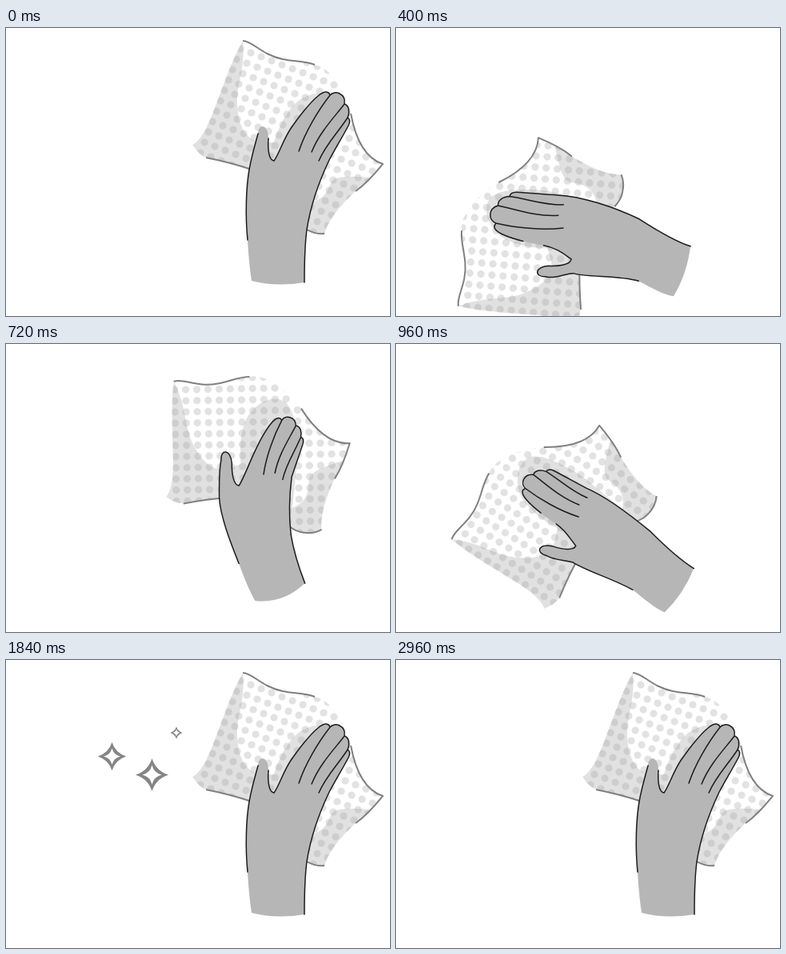
An HTML page with a canvas that plays this animation: 480 px wide and 360 px high, repeating every 3.04 s.

```html
<!DOCTYPE html>
<html lang="en">
<head>
<meta charset="utf-8">
<title>Wiping hand</title>
<style>
  html, body { margin: 0; width: 100%; height: 100%; overflow: hidden; background: #fff; }
  canvas { display: block; width: 480px; height: 360px; }
</style>
</head>
<body>
<canvas id="stage" width="480" height="360"></canvas>
<script>
const ctx = document.getElementById('stage').getContext('2d');
const LOOP = 3040, STEP = 80, SWING = 480, FIRST = 160, LAST = 1120, REST = 1280;
const rad = a => a * Math.PI / 180;
const mix = (a, b, k) => a + (b - a) * k;

// Each row: at rest, far right, passing leftwards, far left, passing rightwards
const channels = {
  baseX:    [340, 339, 342.5, 357.5, 354],
  baseY:    [317, 315, 310, 304, 308],
  baseRot:  [0, -4, -21, -73, -58],
  reachA:   [-79, -74, -95.8, -165, -144.9],
  reachR:   [228.2, 226, 225.7, 237.6, 234.7],
  clothRot: [0, 6, -22, -106, -79],
  fingerX:  [-3.8, -15.5, -15.7, -14.6, -16.1],
  fingerY:  [65.3, 77, 78.9, 78, 74.4],
  fingerRot:[0, 8, 11.5, -9, -12],
  fingerLen:[1, .94, .89, 1.05, .94],
  thumbX:   [-47.5, -60, -59.4, -68.5, -64.8],
  thumbY:   [72, 74, 73.6, 74, 75.8],
  thumbRot: [0, 12, 18, 13, 2],
  bulge:    [0, 20, 28, 0, 0]
};

// Smooth periodic curve through the values at 0, 60, 180 and 240 degrees
function wave([, right, toLeft, left, toRight], p) {
  const c = (right - left) / 2;
  const d = (right + left - toLeft - toRight) / 3;
  const a = (right + left) / 2 - d;
  const s = ((toLeft - toRight) / 2 - c / 2) / Math.sin(Math.PI / 3);
  return a + c * Math.cos(p) + s * Math.sin(p) + d * Math.cos(2 * p);
}

function poseAt(t) {
  const swing = Math.min(Math.max(t, FIRST), LAST);
  const p = (swing - FIRST) / SWING * 2 * Math.PI;
  let k = 1;
  if (t < FIRST) k = t / FIRST;
  if (t > LAST) k = Math.max(0, (REST - t) / (REST - LAST));
  const pose = {};
  for (const name in channels) {
    const v = channels[name];
    pose[name] = mix(v[0], wave(v, p), k);
  }
  pose.moving = k > 0;
  return pose;
}

// Turn and scale around (px, py), then carry that pivot to (x, y)
function bone(px, py, x, y, deg, size = 1) {
  const c = size * Math.cos(rad(deg)), s = size * Math.sin(rad(deg));
  return (u, v) => [
    x + (u - px) * c - (v - py) * s,
    y + (u - px) * s + (v - py) * c
  ];
}

const blend = (a, b, w) => [mix(a[0], b[0], w), mix(a[1], b[1], w)];

function rig(q) {
  const cx = q.baseX + q.reachR * Math.cos(rad(q.reachA));
  const cy = q.baseY + q.reachR * Math.sin(rad(q.reachA));
  const cloth = bone(0, 0, cx, cy, q.clothRot);
  const base = bone(340, 317, q.baseX, q.baseY, q.baseRot);
  const finger = bone(379.7, 158.3, ...cloth(q.fingerX, q.fingerY),
    q.clothRot + q.fingerRot, q.fingerLen);
  const thumb = bone(336, 165, ...cloth(q.thumbX, q.thumbY), q.clothRot + q.thumbRot);
  const joint = tip => (x, y, w) => {
    const r = blend(base(x, y), tip(x, y), w);
    return [r[0] + q.bulge * w * (1 - w), r[1]];
  };
  return { cx, cy, base, finger, thumb, arm: joint(finger), heel: joint(thumb) };
}

// Adds cubic pieces (three points each) to the current path
function curves(pts) {
  for (let i = 0; i + 2 < pts.length; i += 3)
    ctx.bezierCurveTo(...pts[i], ...pts[i + 1], ...pts[i + 2]);
}

function line(start, pts) {
  ctx.moveTo(...start);
  curves(pts);
}

const clothShape = new Path2D(`M296 16 C308 16 320 34 346 39 C360 42 374 41 386 46
  C405 50 420 72 431 107 C437 140 450 163 471 170 C463 180 450 195 437 204
  C418 222 404 238 398 257 Q386 258 376 252 Q368 248 362 238 L304 176 Q280 168 250 162
  Q240 158 233 146 C256 135 268 65 296 16Z`);
const clothLight = new Path2D(`M295 10 C302 50 284 75 290 106 C293 130 305 141 318 143
  L335 143 C342 120 355 95 372 87 C390 78 410 80 417 95 C421 112 416 130 405 160
  L374 218 C392 218 400 210 407 192 C412 185 430 185 455 187 L490 170 L480 0Z`);
const clothEdge = new Path2D(`M296 16 C308 16 320 34 346 39 C360 42 374 41 386 46
  M431 107 C437 140 450 163 471 170 C463 180 450 195 437 204
  M398 257 Q386 258 376 252 Q368 248 362 238 M304 176 Q280 168 250 162`);
const dots = new Path2D();
for (let i = -14; i < 14; i++) {
  for (let j = -14; j < 14; j++) {
    const x = 354 + i * 13 + j * 5, y = 139 + i * 5 - j * 13;
    dots.moveTo(x + 4.6, y);
    dots.arc(x, y, 4.6, 0, 7);
  }
}

function drawCloth(r, q) {
  ctx.save();
  ctx.translate(r.cx, r.cy);
  ctx.rotate(rad(q.clothRot));
  ctx.translate(-383.5, -93);
  ctx.save();
  ctx.clip(clothShape);
  ctx.fillStyle = '#e1e1e1';
  ctx.fill(clothShape);
  ctx.fillStyle = '#fff';
  ctx.fill(clothLight);
  ctx.fillStyle = 'rgba(160,160,160,.3)';
  ctx.fill(dots);
  ctx.restore();
  ctx.strokeStyle = '#808080';
  ctx.lineWidth = 2;
  ctx.stroke(clothEdge);
  ctx.restore();
}

function drawHand(r, q) {
  const { base: B, finger: F, thumb: T, arm: A, heel: H } = r;
  const cuffL = B(307, 316), cuffR = B(373, 318);
  const sleeve = A(302, 265, .14), heel = H(304, 177, .42);
  const side = T(315, 132), inner = T(328, 138), web = T(335, 166);
  const k1 = F(357, 124), k2 = F(372, 104);
  const index = F(405, 84), middle = F(423, 95), ring = F(427, 112), little = F(428, 122);

  const cuffEdge = [B(305, 302), A(303, 285, .07), sleeve];
  const outer = [A(299, 235, .24), H(300, 200, .27), heel];
  const thumbOut = [H(307, 160, .65), T(311, 147), side];
  const thumbTip = [T(315, 119), T(328, 119), inner];
  const thumbIn = [T(327, 150), T(328, 165), web];
  const palm = [T(341, 158), F(347, 138), k1];
  const gap = [F(362, 117), F(367, 110), k2];
  const tips = [
    F(381, 93), F(400, 71), index,
    F(411, 77), F(425, 82), middle,
    F(429, 97), F(430, 105), ring,
    F(430, 114), F(430, 118), little
  ];
  const back = [F(420, 137), F(412, 150), F(404, 165), A(394, 186, .8), A(381, 220, .43), A(376, 252, .22),
    A(373, 275, .1), B(373, 300), cuffR];

  ctx.beginPath();
  line(cuffL, [...cuffEdge, ...outer, ...thumbOut, ...thumbTip, ...thumbIn, ...palm, ...gap, ...tips, ...back]);
  ctx.quadraticCurveTo(...B(338, 324 + q.bulge * .3), ...cuffL);
  ctx.fillStyle = '#b6b6b6';
  ctx.fill();

  ctx.beginPath();
  line(sleeve, [...outer, ...thumbOut]);
  if (q.moving) line(side, thumbTip);
  line(inner, [...thumbIn, ...palm]);
  if (q.clothRot > -50) line(k1, gap);
  line(k2, [...tips, ...back]);
  line(F(366, 154), [F(374, 130), F(390, 103), index]);
  line(F(382, 155), [F(392, 130), F(410, 112), middle]);
  line(F(391, 166), [F(400, 145), F(414, 132), ring]);
  ctx.strokeStyle = '#1c1c1c';
  ctx.lineWidth = 1.5;
  ctx.lineCap = ctx.lineJoin = 'round';
  ctx.stroke();
  ctx.lineCap = 'butt';
}

const sparkles = [
  { x: 132.5, y: 120.5, r: 16.5, keys: [[1520, 0], [1760, 1.3], [1920, .85], [2080, 1.18], [2400, 1]] },
  { x: 182.5, y: 143.5, r: 20, keys: [[1600, 0], [1840, 1.03], [2000, .8], [2160, 1.03], [2400, 1]] },
  { x: 213, y: 91, r: 11.5, keys: [[1680, 0], [1920, 1], [2080, .75], [2240, 1], [2320, .9], [2400, 1]] }
];
const FADE = [[2480, 1], [2800, 0]];

function keyed(keys, t) {
  if (t <= keys[0][0]) return keys[0][1];
  for (let i = 1; i < keys.length; i++) {
    const [ta, a] = keys[i - 1], [tb, b] = keys[i];
    if (t < tb) return mix(a, b, (t - ta) / (tb - ta));
  }
  return keys[keys.length - 1][1];
}

function star(x, y, r, bend, color) {
  ctx.beginPath();
  ctx.moveTo(x + r, y);
  for (let i = 0; i < 4; i++) {
    const m = rad(i * 90 + 45), n = rad(i * 90 + 90);
    ctx.quadraticCurveTo(x + r * bend * Math.cos(m), y + r * bend * Math.sin(m),
      x + r * Math.cos(n), y + r * Math.sin(n));
  }
  ctx.fillStyle = color;
  ctx.fill();
}

function drawSparkles(t) {
  for (const s of sparkles) {
    const r = s.r * keyed(s.keys, t) * keyed(FADE, t);
    if (r <= 0) continue;
    star(s.x, s.y, r, .34, '#858585');
    star(s.x, s.y, r * .58, .28, '#fff');
  }
}

const start = performance.now();
function frame() {
  const now = (performance.now() - start) % LOOP;
  const t = Math.floor(now / STEP) * STEP;
  const q = poseAt(t), r = rig(q);
  ctx.clearRect(0, 0, 480, 360);
  drawCloth(r, q);
  drawHand(r, q);
  drawSparkles(t);
  requestAnimationFrame(frame);
}
frame();
</script>
</body>
</html>
```
